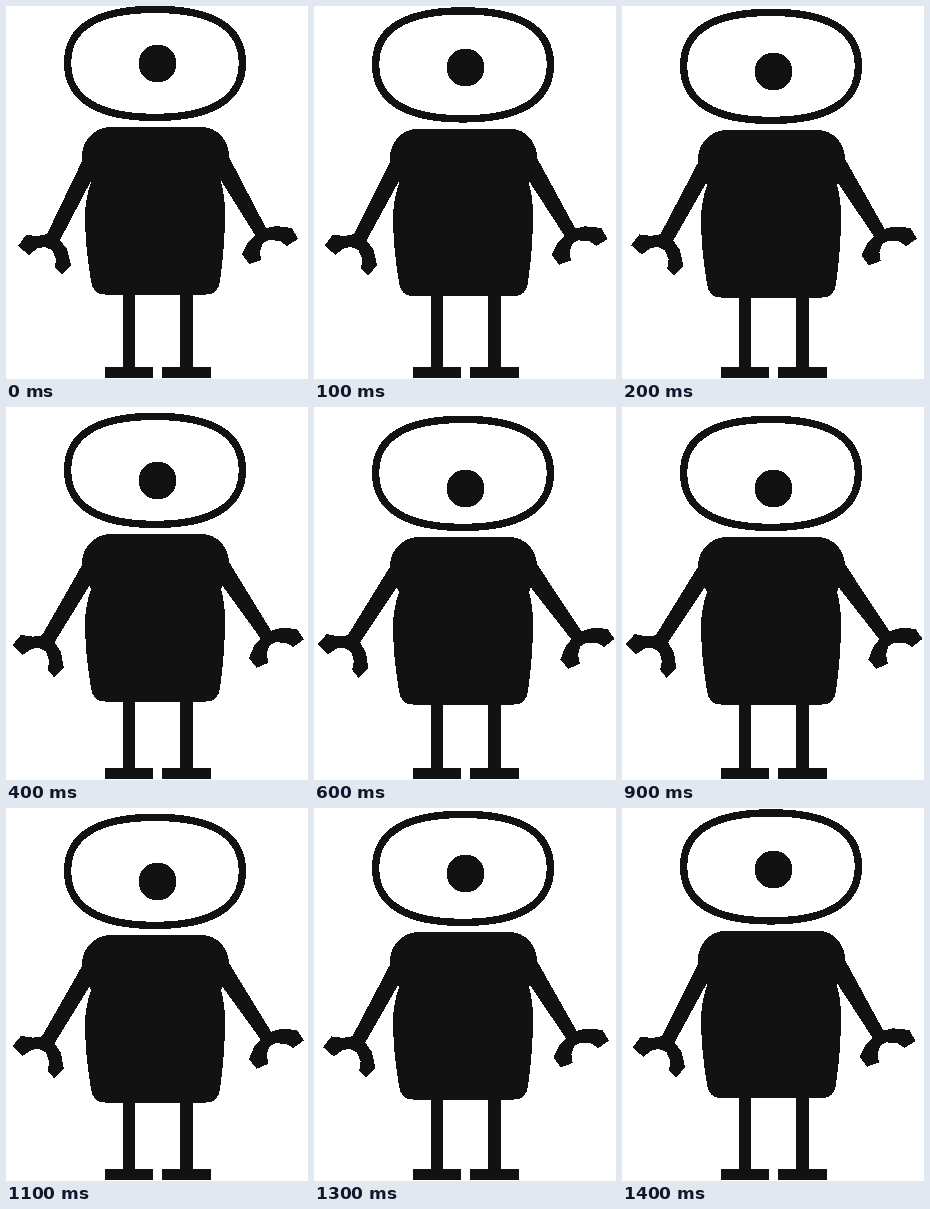
These frames come from a looping animation (302x373 px, 1.5 s). An HTML page:

```html
<!DOCTYPE html>
<html lang="en">
<head>
<meta charset="utf-8">
<title>Bobbing robot</title>
<style>
  html, body { margin: 0; width: 100%; height: 100%; overflow: hidden; background: #fff; }
  svg { display: block; width: 302px; height: 373px; fill: #121212; shape-rendering: crispEdges; }
</style>
</head>
<body>
<svg viewBox="0 0 302 373">
  <path d="M117 270h12v91h18v11H99v-11h18zM174 270h13v91h18v11h-49v-11h18z"/>
  <g id="upper">
    <path d="M149 3.4C204 3.4 236.4 20 236.4 57S204 111.4 149 111.4 61.6 94 61.6 57 94 3.4 149 3.4Z"
      fill="none" stroke="#121212" stroke-width="7.4"/>
    <path d="M105 121H195C212 121 223 135 223 150V157L215 176Q219 190 219 207Q219 240 214 275
      Q212 288.5 200 288.5H99Q87 288.5 85 275Q79 240 79 207Q80 190 85 176L76 157V150C76 135 88 121 105 121Z"/>
    <path id="left" d="M78 151L41 228 32 230 20 229 12 240 23 249 32 242 39 241 46 244 50 253 49 262
      56 269 65 259 61 243 54 234 86 173 95 150Z"/>
    <path id="right" d="M223 151L260 222 270 220 286 222 292 233 281 240 274 235 263 234 257 237
      254 245 255 254 243 258 236 248 242 236 249 229 214 173 205 150Z"/>
  </g>
  <rect id="eye" x="133" y="39" width="37" height="37" rx="17"/>
</svg>
<script>
  const STEP = 100, STEPS = 15;
  const move = (id, value) => document.getElementById(id).setAttribute('transform', value);

  function draw(now) {
    const step = Math.floor(now / STEP) % STEPS;
    const depth = Math.min(step, STEPS - step);
    move('upper', `translate(0 ${depth * 1.5})`);
    move('eye', `translate(0 ${depth * 4})`);
    move('left', `rotate(${depth} 120 154)`);
    move('right', `rotate(${-depth} 200 147)`);
    requestAnimationFrame(draw);
  }
  draw(performance.now());
</script>
</body>
</html>
```
